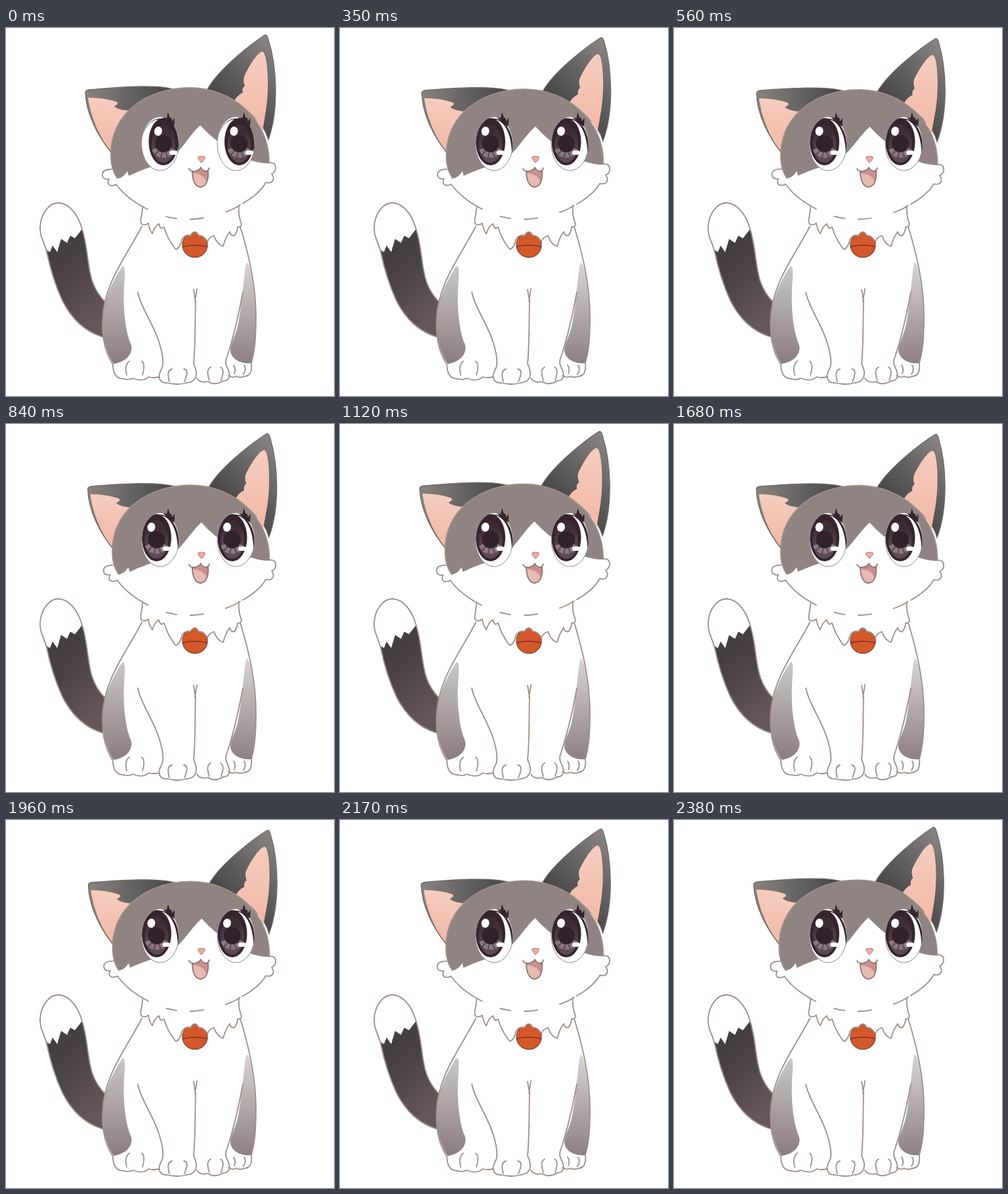
An HTML page for the animation above (2450 ms loop, 500 px wide and 560 px high).

```html
<!DOCTYPE html>
<html lang="en">
<head>
<meta charset="utf-8">
<title>Kitten</title>
<style>
  html, body { margin: 0; width: 100%; height: 100%; overflow: hidden; background: #fff; }
  svg { display: block; width: 500px; height: 560px; }
  .line { fill: none; stroke: #9c8f89; stroke-width: 1.8; stroke-linecap: round; stroke-linejoin: round; }
  .white { fill: #fff; }
  .dark { fill: #35242e; }
</style>
</head>
<body>
<svg viewBox="0 0 500 560">
  <defs>
    <linearGradient id="tailFill" x1="0" y1="0" x2=".5" y2="1">
      <stop stop-color="#403b3c"/><stop offset=".5" stop-color="#4b4343"/><stop offset="1" stop-color="#65565a"/>
    </linearGradient>
    <linearGradient id="flank" x1="0" y1="0" x2="0" y2="1">
      <stop stop-color="#cbc7c7"/><stop offset="1" stop-color="#8a7c7f"/>
    </linearGradient>
    <linearGradient id="flankLight" x1="0" y1="0" x2="0" y2="1">
      <stop stop-color="#d8d4d4"/><stop offset="1" stop-color="#8d8083"/>
    </linearGradient>
    <linearGradient id="leftEarFill">
      <stop stop-color="#89847f"/><stop offset=".5" stop-color="#656263"/><stop offset="1" stop-color="#434243"/>
    </linearGradient>
    <linearGradient id="rightEarFill" x1=".9" y1="0" x2=".4" y2=".8">
      <stop stop-color="#8c8785"/><stop offset=".5" stop-color="#666364"/><stop offset="1" stop-color="#454344"/>
    </linearGradient>
    <linearGradient id="pink" x1="0" y1="0" x2="0" y2="1">
      <stop stop-color="#f6cdbf"/><stop offset="1" stop-color="#f1b8a7"/>
    </linearGradient>
    <linearGradient id="irisFill" x1="0" y1="0" x2="0" y2="1">
      <stop offset=".2" stop-color="#3d2b36"/><stop offset=".8" stop-color="#5c4956"/>
    </linearGradient>
    <clipPath id="eyeClip"><ellipse rx="28" ry="40.5"/></clipPath>
    <path id="squint" d="M-21 14C-18 -6 0 -18 20 -18Q35 -11 36 4C33 19 20 26 5 26Q-11 25 -21 14Z"/>
    <clipPath id="squintClip"><use href="#squint"/></clipPath>
    <g id="iris">
      <ellipse rx="22.5" ry="36" class="dark"/>
      <ellipse cy="3" rx="18" ry="29" fill="url(#irisFill)"/>
      <path d="M-14 11A15 15 0 0 0 14 11" fill="none" stroke="#8c7884" stroke-width="8" stroke-dasharray="6 2"/>
      <circle cy="3" r="13" fill="#30212b"/>
    </g>
    <g id="shine" class="white">
      <ellipse cx="-8" cy="-16" rx="6" ry="7" transform="rotate(12 -8 -16)"/>
      <rect x="9" y="13.5" width="12" height="6.5" rx="3"/>
    </g>
    <g id="eye">
      <ellipse rx="28.5" ry="41" fill="#fff" stroke="#94878c"/>
      <g clip-path="url(#eyeClip)"><g class="gaze"><use href="#iris" y="-3"/><use href="#shine" y="-3"/></g></g>
      <path class="dark" d="M-27 -12A28.5 41 0 0 1 27 14C26 -18 14 -36 0 -37C-14 -37 -22 -26 -27 -12Z"/>
      <path class="dark" d="M4 -40L10 -39L12 -48L15 -39Q18 -41 18 -34L22 -39Q22 -29 21 -26Z"/>
    </g>
  </defs>

  <!-- tail -->
  <path fill="url(#tailFill)" d="M62 338L67 341L71 331L78 341L84 321L93 327L98 316L105 320L116 306C130 350 119 385 152 418L147 470Q108 458 86 415Q70 380 62 338Z"/>
  <path class="line" d="M147 470Q108 458 86 415Q70 380 62 340C56 320 52 318 52 303C53 282 66 266 80 266C99 267 111 288 116 306C130 350 119 385 152 418"/>

  <!-- body -->
  <path class="white" d="M207 302C185 345 148 390 147 445C146 480 155 500 163 512C164 530 172 534 235 532Q236 541 250 541H330L340 531Q375 532 374 510C385 470 388 380 356 302Z"/>
  <path fill="url(#flank)" d="M178 362C183 364 181 375 180 395C178 430 183 465 190 480C195 491 187 508 164 511C150 490 145 460 147 440C150 410 165 380 178 362Z"/>
  <path fill="url(#flankLight)" d="M366 358C373 350 381 410 381 440C381 480 378 500 374 510C355 512 342 501 342 490C343 478 350 470 354 450C360 420 362 380 366 358Z"/>
  <g class="line">
    <path d="M207 302C185 345 148 390 147 445C146 480 155 500 163 512C163 526 168 534 180 534Q187 536 193 533Q210 539 217 531Q224 533 234 531"/>
    <path d="M357 302C370 345 381 390 381 440C381 480 378 495 374 510Q376 529 364 530Q357 533 351 530Q345 533 339 529"/>
    <path d="M201 402C205 425 225 450 234 480C240 500 241 512 237 519C230 531 234 541 246 540Q262 544 275 540Q291 539 290 523Q288 514 286 511C289 480 288 440 289 416L286 398M288 416L291 397"/>
    <path d="M361 402C354 440 347 470 337 500Q333 509 337 516C343 528 342 537 331 537Q318 545 308 538Q296 541 291 533"/>
    <path d="M184 528Q180 513 188 507M208 528Q213 512 207 507M249 538Q244 521 253 519M272 538Q280 520 271 519M310 536Q304 520 312 516M328 536Q334 519 327 516M348 526Q351 518 347 513M362 527Q367 519 363 513"/>
  </g>

  <!-- bell and chest fur -->
  <circle cx="288" cy="330" r="19" fill="#d3582b" stroke="#8d4d39" stroke-width="1.5"/>
  <path d="M269 333Q288 328 307 333" fill="none" stroke="#7b2c1c" stroke-width="1.6"/>
  <path class="line" style="fill:#fff" d="M208 273C208 285 202 297 208 299Q212 301 217 297Q218 306 223 313Q227 301 233 298Q234 303 237 305L241 303Q247 323 259 337Q266 334 268 322Q274 313 281 316Q288 305 294 316Q301 315 307 325Q310 318 317 316Q322 330 331 332Q335 318 341 310Q343 317 348 316Q353 310 353 303Q361 303 358 295Q354 285 355 270"/>

  <!-- head -->
  <g id="head">
    <g stroke="#6f6765" stroke-width="1.3">
      <path fill="url(#leftEarFill)" d="M121 98Q121 95 126 94C170 90 230 85 258 94C220 105 185 130 161 190C140 165 122 130 121 98Z"/>
      <path fill="url(#rightEarFill)" d="M306 95C325 60 380 20 394 11Q398 9 400 18C412 55 417 122 400 170C395 150 370 115 306 95Z"/>
    </g>
    <path fill="url(#pink)" d="M125 106Q150 106 168 112Q174 115 165 119Q171 126 196 126C180 140 165 165 160 187C145 170 130 140 125 106Z"/>
    <path fill="url(#pink)" d="M347 114Q350 104 361 98Q359 92 364 88Q361 80 363 74C370 58 384 36 391 36C398 37 402 85 397 120Q394 140 391 157C385 140 370 122 347 114Z"/>
    <path class="white" d="M160 195C158 130 215 91 280 91S402 140 401 205Q411 204 411 213Q411 219 405 222Q411 230 404 235Q400 236 396 235Q386 254 335 280C315 292 250 292 216 276Q185 262 168 239Q157 243 157 233Q146 231 147 222Q149 215 161 215Z"/>
    <path fill="#908482" d="M160 195C158 130 215 91 280 91S402 140 401 206Q372 206 342 186Q314 168 296 148C274 169 267 191 239 206Q212 213 187 225L185 218Q178 229 170 229Q161 217 160 195Z"/>
    <g class="line">
      <path d="M170 229Q160 215 160 195C158 130 215 91 280 91S402 140 401 205Q411 204 411 213Q411 219 405 222Q411 230 404 235Q400 236 396 235Q387 252 361 267M357 269Q349 275 335 280"/>
      <path d="M161 215Q148 215 147 222Q146 231 157 230Q153 238 160 240Q166 240 168 238Q184 260 216 276M244 287Q252 289 260 290M281 291Q292 291 301 289"/>
    </g>
  </g>

  <!-- face -->
  <use id="openEye" href="#eye" x="235" y="176"/>
  <use href="#eye" x="350.5" y="176"/>
  <g id="winkEye">
    <use href="#squint" class="white"/>
    <g clip-path="url(#squintClip)"><use href="#iris" x="3" y="1"/><use href="#shine" x="3" y="-2"/></g>
    <path class="dark" d="M-21 17L-29 7L-25 5L-31 -7L-22 -5C-15 -19 -3 -27 10 -27C30 -28 39 -11 39 5Q38 18 34 25C36 5 32 -8 19 -17C2 -20 -15 -9 -20 9Z"/>
  </g>
  <path d="M293 196Q298 194 303 196Q305 198 298 205Q291 198 293 196Z" fill="#f0a99e" stroke="#a67f78"/>
  <path d="M284 218Q292 219 297 213Q302 220 309 217C309 230 306 241 297 242C288 242 284 231 284 218Z" fill="#c98f8c"/>
  <path d="M285 221Q301 222 306 234Q302 242 297 242C288 242 285 231 285 221Z" fill="#e6bab3"/>
  <path class="line" style="stroke:#8e7773" d="M279 214Q281 219 288 218Q296 216 297 212Q299 217 305 218Q309 217 310 213M284 218C284 231 288 242 297 242C306 241 309 230 308 218"/>
</svg>
<script>
  const LOOP = 2450, STEP = 70, NOD = 1190, WINK = 1400;
  const head = document.getElementById('head');
  const openEye = document.getElementById('openEye');
  const winkEye = document.getElementById('winkEye');
  const gazes = document.querySelectorAll('.gaze');
  const clamp = v => Math.min(1, Math.max(0, v));

  // Two nods per loop; the second is a little longer.
  function nod(t) {
    const phase = t < NOD ? t / NOD : (t - NOD) / (LOOP - NOD);
    return Math.sin(Math.PI * phase) ** 1.3;
  }

  // Lean and squash the head around the chin at (281, 290).
  function poseHead(k) {
    const a = 1 - .0093 * k, b = .0117 * k, c = -.0181 * k, d = 1 - .0148 * k;
    const e = 281 - a * 281 - c * 290, f = 290 - b * 281 - d * 290;
    head.setAttribute('transform', `matrix(${a} ${b} ${c} ${d} ${e} ${f})`);
  }

  function draw(now) {
    const t = Math.floor(now % LOOP / STEP) * STEP;
    poseHead(nod(t));

    const look = 5 - 10.5 * clamp(t / 210);
    gazes.forEach(g => g.setAttribute('transform', `translate(${look} 0)`));

    const gap = Math.abs(t - WINK), winking = gap < 2 * STEP;
    openEye.style.display = winking ? 'none' : '';
    winkEye.style.display = winking ? '' : 'none';
    const lid = Math.max(.15, clamp(gap / STEP));
    winkEye.setAttribute('transform', `translate(235 ${176 + 14 * (1 - lid)}) scale(1 ${lid})`);
    requestAnimationFrame(() => draw(performance.now()));
  }
  draw(0);
</script>
</body>
</html>
```
